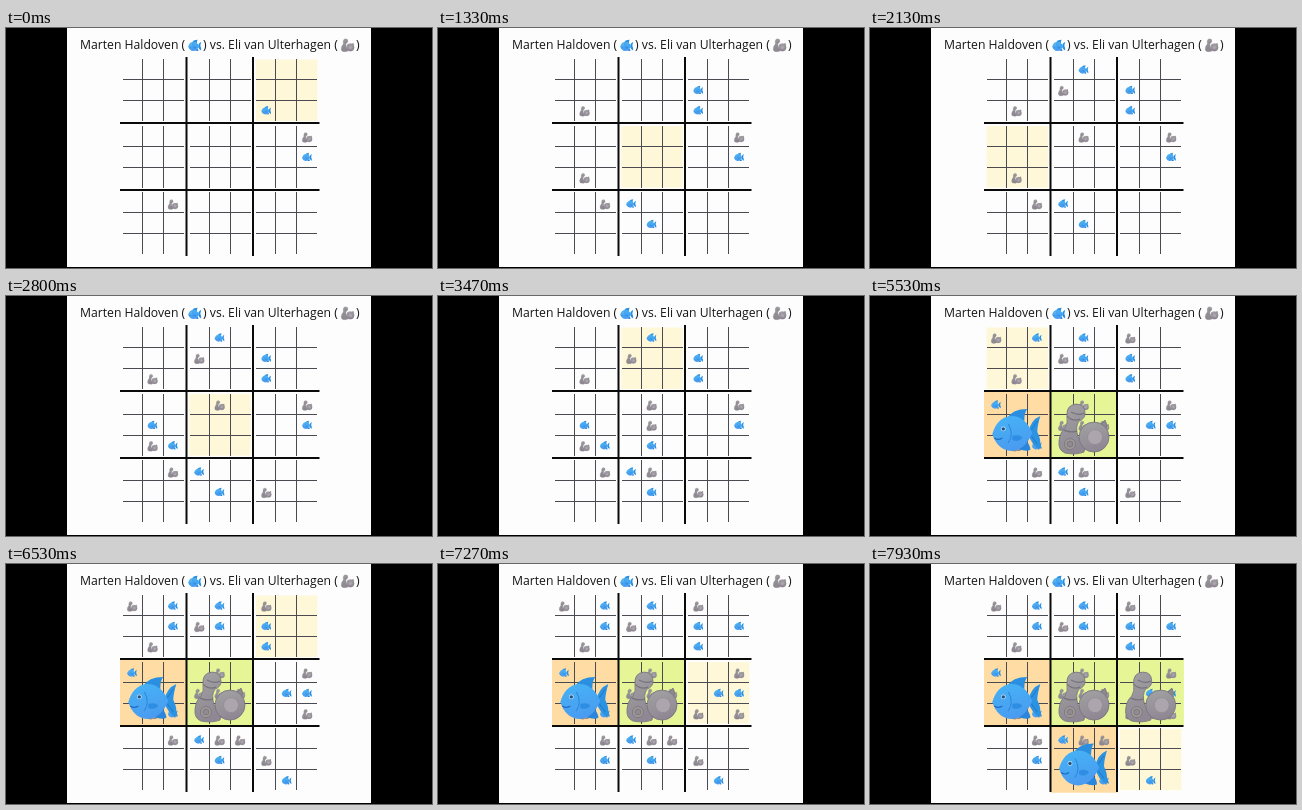
Recreate the animation shown at these times as an HTML page. Size 426 px wide and 240 px high, loop 8 s.

```html
<!DOCTYPE html>
<html lang="en">
<head>
<meta charset="utf-8">
<title>Ultimate tic-tac-toe</title>
<style>
  html, body { margin: 0; width: 100%; height: 100%; overflow: hidden; background: #000; }
  svg { display: block; width: 100vw; height: 100vh; }
  text { font: 12.2px "Open Sans", "Noto Sans", sans-serif; fill: #151515; }
</style>
</head>
<body>
<svg id="stage" viewBox="0 0 426 240">
  <defs>
    <linearGradient id="blue" x2="0.3" y2="1">
      <stop offset="0" stop-color="#45b4f6"/>
      <stop offset="1" stop-color="#4a9cf0"/>
    </linearGradient>
    <linearGradient id="steel" x2="0.3" y2="1">
      <stop offset="0" stop-color="#a3a3a3"/>
      <stop offset="1" stop-color="#8f8894"/>
    </linearGradient>
    <g id="fish" stroke-linejoin="round">
      <path d="M-10 -16Q-5 -25 10 -25Q7 -22 7 -13Z" fill="#2a8fe0"/>
      <path d="M1 15Q8 18 13 16Q13 11 9 7Z" fill="#2a86dc"/>
      <path d="M11 -1Q13 -14 23 -18Q20 -8 20 -2Q24 5 23 15Q14 12 11 -1Z" fill="#2c92e2"/>
      <path d="M14 -4L20 -13M14 2L20 10" stroke="#1c78cc"/>
      <path d="M-25 0Q-20 -17 -6 -18Q8 -18 15 -1Q8 16 -6 17Q-20 16 -25 0Z" fill="url(#blue)"/>
      <path d="M-9 -10Q-3 0 -9 9" fill="none" stroke="#2a86dc"/>
      <path d="M-5 2Q3 0 5 4Q1 9 -5 6Z" fill="#2f8ee4"/>
      <path d="M-23 4Q-19 7 -15 4" fill="none" stroke="#1c6cc0" stroke-width="1.2"/>
      <circle cx="-14" cy="-5" r="2.4" fill="#bfe2fb"/>
      <circle cx="-14" cy="-5" r="1.7" fill="#24527c"/>
    </g>
    <g id="arm" stroke="#77727c" stroke-width=".8" stroke-linejoin="round">
      <path d="M15 -2L21 -8L23 -3L21 3Z" fill="#8d8890"/>
      <path d="M-17 -12Q-18 -23 -8 -24Q1 -24 1 -15Q1 -9 -5 -7Q-9 -2 -6 9L2 14L0 24Q-8 27 -19 25Q-26 22 -25 13Q-24 4 -19 0Q-16 -5 -17 -12Z" fill="url(#steel)"/>
      <circle cx="10" cy="9" r="15" fill="url(#steel)"/>
      <path d="M-17 -12Q-11 -6 -4 -9M-13 -16Q-6 -12 0 -15M-20 2Q-13 5 -7 3" fill="none" stroke-width="1.2"/>
      <circle cx="-14" cy="16" r="5.5" fill="#a09c98"/>
      <circle cx="-14" cy="16" r="3" fill="#8f8b90"/>
      <circle cx="11" cy="9" r="7.5" fill="#aca5ae" stroke="#938c98"/>
    </g>
  </defs>
  <rect x="61" width="304" height="239" fill="#fdfdfd"/>
  <text x="74" y="21">Marten Haldoven (</text>
  <text x="197" y="21">) vs. Eli van Ulterhagen (</text>
  <text x="350" y="21">)</text>
  <use href="#fish" transform="translate(189 18.5) scale(.27)"/>
  <use href="#arm" transform="translate(341.7 17) scale(.26)"/>
  <g id="fills"></g>
  <path id="thin" fill="none" stroke="#4a4a50" stroke-width="1"/>
  <path d="M180.5 29V228M247 29V228M114 95H313.5M114 162H313.5" stroke="#0a0a0a" stroke-width="2"/>
  <g id="marks"></g>
  <g id="winners"></g>
</svg>
<script>
const LOOP = 8000, MOVE_MS = 250, LEAD_MS = 55, OPENING = 4;
const PLAYERS = ["fish", "arm"];
const WIN_FILL = { fish: "#ffdca4", arm: "#e6f596" };
const ACTIVE_FILL = "#fff8d8";
// Each move is a board digit followed by a cell digit; players alternate.
const moves = ("55 52 26 62 23 37 70 07 74 41 11 13 38 83 34 44 47 71 14 45 54 43 " +
  "30 00 02 20 05 58 87 72 25 56 65 57 78").split(" ").map(m => [+m[0], +m[1]]);
const rows = ["012", "345", "678", "036", "147", "258", "048", "246"];

const byId = id => document.getElementById(id);
const col = i => i % 3, row = i => Math.floor(i / 3);
const boardX = b => 114 + 66.7 * col(b);
const boardY = b => 29 + 66.6 * row(b);

function add(parent, tag, attrs) {
  const node = document.createElementNS("http://www.w3.org/2000/svg", tag);
  for (const key in attrs) node.setAttribute(key, attrs[key]);
  return byId(parent).appendChild(node);
}

function stamp(parent, player, x, y, scale) {
  add(parent, "use", { href: "#" + player, transform: `translate(${x} ${y}) scale(${scale})` });
}

function fillBoard(b, fill, inset) {
  const size = 66.5 - 2 * inset;
  add("fills", "rect", { x: boardX(b) + inset, y: boardY(b) + inset, width: size, height: size, fill });
}

function drawGrid() {
  let d = "";
  for (let b = 0; b < 9; b++) {
    const x = Math.round(boardX(b)), y = Math.round(boardY(b));
    for (const k of [22.5, 43.5]) {
      d += `M${x + k} ${y + 2}v62M${x + 3} ${y + k}h61`;
    }
  }
  byId("thin").setAttribute("d", d);
}

function drawPosition(count) {
  for (const id of ["fills", "marks", "winners"]) byId(id).replaceChildren();
  const cells = Array.from({ length: 9 }, () => []);
  const won = [];
  moves.slice(0, count).forEach(([b, c], i) => {
    const player = PLAYERS[i % 2];
    cells[b][c] = player;
    if (rows.some(r => [...r].every(k => cells[b][k] === player))) won[b] = player;
    stamp("marks", player, 126.2 + 20.4 * col(c) + 67.1 * col(b),
      42.3 + 20.4 * row(c) + 67 * row(b), 0.2);
  });
  fillBoard(moves[count - 1][1], ACTIVE_FILL, 2.5);
  won.forEach((player, b) => {
    fillBoard(b, WIN_FILL[player], 0);
    stamp("winners", player, boardX(b) + 33.3, boardY(b) + (player === "fish" ? 42.3 : 36.5), 1);
  });
}

let shown = 0;
function tick() {
  const t = performance.now() % LOOP;
  const count = Math.min(moves.length, OPENING + Math.floor((t + LEAD_MS) / MOVE_MS));
  if (count !== shown) drawPosition(shown = count);
  requestAnimationFrame(tick);
}

drawGrid();
tick();
</script>
</body>
</html>
```
